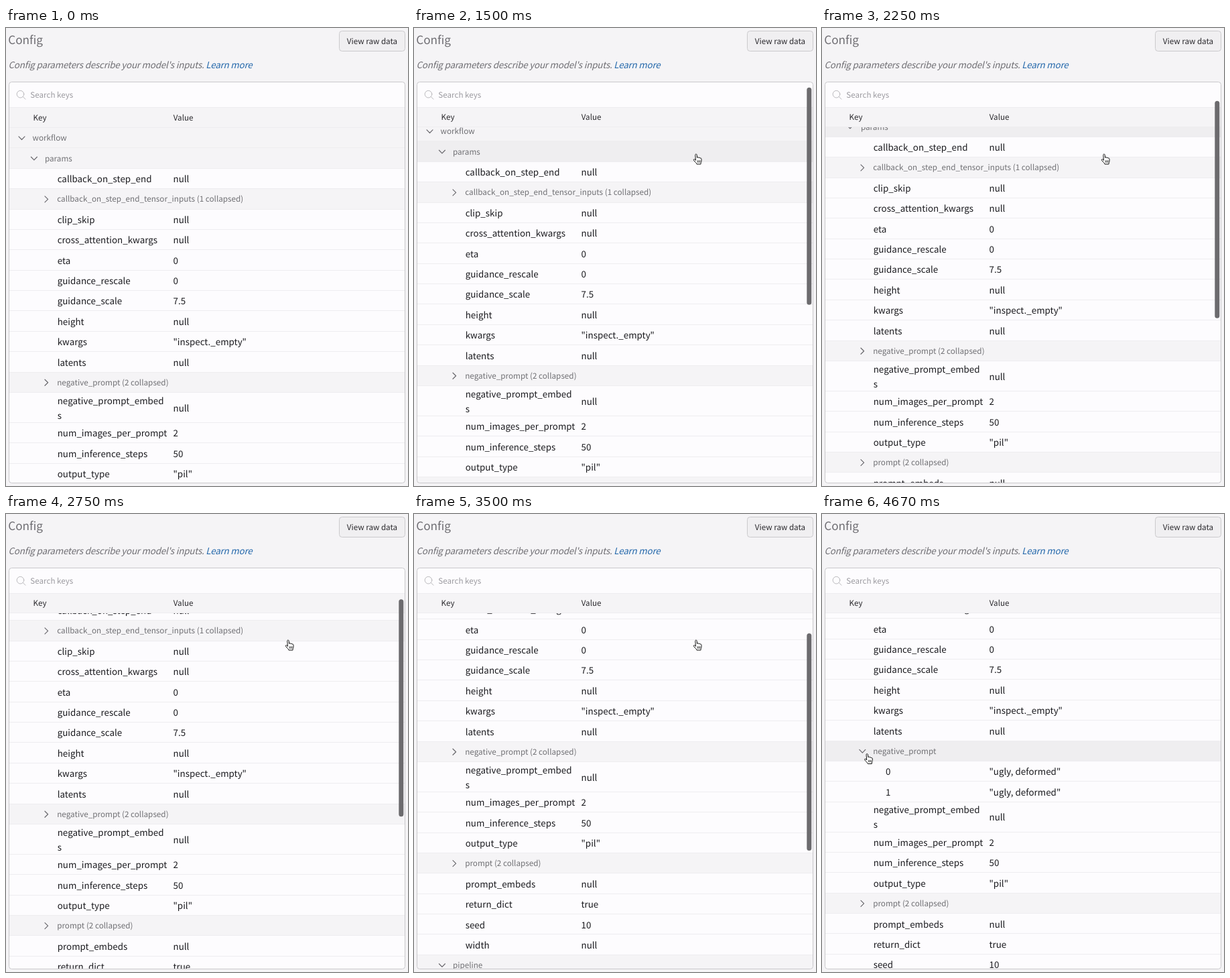
Animation of 600 by 683 pixels, one loop 5.01 s. Source, as an HTML page:

```html
<!DOCTYPE html>
<html lang="en">
<head>
<meta charset="utf-8">
<title>Config</title>
<style>
  html, body { margin: 0; width: 100%; height: 100%; overflow: hidden; background: #f5f4f6; }
  svg { display: block; width: 600px; height: 683px; }
  text {
    font: 11.65px "Noto Sans CJK JP", "Noto Sans CJK SC", "Noto Sans", sans-serif;
    text-rendering: geometricPrecision;
    fill: #2b2a2e;
  }
  .title { font-size: 17.2px; fill: #6f6e73; }
  .intro { font-size: 13.4px; font-style: italic; letter-spacing: -.2px; fill: #6f6e73; }
  .link { fill: #2468ab; }
  .hint { fill: #9c9ba0; }
  .cell { font-size: 13.4px; fill: #1b1b1f; }
  .group { font-size: 11.72px; fill: #707074; }
  .icon { fill: none; stroke: #6a696e; stroke-width: 1.2; stroke-linecap: round; stroke-linejoin: round; }
</style>
</head>
<body>
<svg viewBox="0 0 600 683">
  <clipPath id="inside"><rect x="5" y="81" width="590" height="597" rx="3"/></clipPath>
  <rect width="600" height="683" fill="#f5f4f6"/>
  <text class="title" x="3.2" y="24">Config</text>
  <rect x="497.5" y="4.5" width="98" height="30" rx="4" fill="#f0eff1" stroke="#cbcacd"/>
  <text x="546.5" y="24" text-anchor="middle">View raw data</text>
  <text class="intro" x="3.5" y="60">Config parameters describe your model's inputs. <tspan class="link">Learn more</tspan></text>

  <g clip-path="url(#inside)">
    <rect x="5" y="81" width="590" height="597" fill="#fdfcfe"/>
    <g id="rows"></g>
    <g id="header">
      <rect x="5" y="118" width="590" height="31" fill="#f5f4f6"/>
      <rect x="5" y="148" width="590" height="1" fill="#eeedf0"/>
      <text x="40.5" y="138">Key</text>
      <text x="249.7" y="138">Value</text>
    </g>
    <rect x="5" y="81" width="590" height="37" fill="#fdfcfe"/>
    <rect x="5" y="118" width="590" height="1" fill="#eeedf0"/>
    <g fill="none" stroke="#b9b8bc" stroke-linecap="round">
      <circle cx="21.5" cy="98.7" r="5.3"/>
      <path d="M25.4 102.6L29 106.2"/>
    </g>
    <text class="hint" x="36.3" y="104">Search keys</text>
    <rect id="thumb" x="586.3" width="7" height="324" rx="3.5" fill="#6c6b6e"/>
  </g>
  <rect x="4.5" y="80.5" width="591" height="598" rx="4" fill="none" stroke="#c9c8cb"/>

  <g id="cursor">
    <path id="arrow" d="M0 0V13.6L3.2 10.7L5.3 15.8L7.9 14.7L5.8 9.8H10Z" fill="#000" stroke="#fff"/>
    <g id="hand" transform="translate(-3.6 -1.6)" stroke="#111" stroke-linecap="round" stroke-linejoin="round">
      <path fill="#fff" d="M4 9.6L3.4 2C3.3 .3 5.6 .2 5.8 1.9L6.3 6C6.3 5 8.4 5 8.5 6.3C8.8 5.5 10.5 5.6 10.6 6.9C11 6.3 12.6 6.5 12.6 8V10.5C12.6 12.5 11.6 13 11.6 15.6H5.6C5.2 13.6 3 12.6 1.2 9.9C.2 8.3 2.2 7.4 4 9.6Z"/>
      <path fill="none" stroke-width=".8" d="M6.9 10.3V13M8.7 10.3V13M10.5 10.3V13"/>
    </g>
  </g>
</svg>

<script>
const LOOP = 5010, STEP = 250 / 3, EXPAND_AT = 4580;
const ROW = 30.38, WRAPPED_ROW = 44.9, TOP = 149;
const $ = id => document.getElementById(id);

// [depth, key, value]; a row without a value is a group, "+" marks it as collapsed
const before = [
  [0, 'workflow'],
  [1, 'params'],
  [2, 'callback_on_step_end', 'null'],
  [2, '+callback_on_step_end_tensor_inputs (1 collapsed)'],
  [2, 'clip_skip', 'null'],
  [2, 'cross_attention_kwargs', 'null'],
  [2, 'eta', '0'],
  [2, 'guidance_rescale', '0'],
  [2, 'guidance_scale', '7.5'],
  [2, 'height', 'null'],
  [2, 'kwargs', '"inspect._empty"'],
  [2, 'latents', 'null'],
];
const collapsed = [[2, '+negative_prompt (2 collapsed)']];
const expanded = [
  [2, 'negative_prompt'],
  [3, '0', '"ugly, deformed"'],
  [3, '1', '"ugly, deformed"'],
];
const after = [
  [2, 'negative_prompt_embed|s', 'null'],
  [2, 'num_images_per_prompt', '2'],
  [2, 'num_inference_steps', '50'],
  [2, 'output_type', '"pil"'],
  [2, '+prompt (2 collapsed)'],
  [2, 'prompt_embeds', 'null'],
  [2, 'return_dict', 'true'],
  [2, 'seed', '10'],
  [2, 'width', 'null'],
  [1, 'pipeline'],
];

const scrollKeys = [
  [1250, 0], [1830, 24], [2250, 47], [2750, 81], [3170, 154],
  [3330, 168], [3420, 172], [3500, 174], [3580, 175],
];
const thumbKeys = [[1250, 0], [1330, 1], [4000, 1], [4170, 0]];
const cursorKeys = [
  [500, 551, 246], [580, 512, 236], [670, 478, 227], [920, 478, 227],
  [1000, 471, 224.5], [1080, 450, 212], [1170, 428, 196], [1250, 420, 189],
  [3670, 420, 189], [3750, 405, 198], [3830, 350, 228], [3920, 255, 275],
  [4000, 165, 318], [4080, 110, 341], [4170, 82, 351], [4250, 74, 355],
  [4330, 69, 357.5], [4420, 66.3, 358.5],
];

function sample(keys, t) {
  if (t <= keys[0][0]) return keys[0].slice(1);
  const i = keys.findIndex(k => k[0] > t);
  if (i < 0) return keys[keys.length - 1].slice(1);
  const a = keys[i - 1], b = keys[i];
  const p = (t - a[0]) / (b[0] - a[0]);
  return a.slice(1).map((v, n) => v + (b[n + 1] - v) * p);
}

function layout(list) {
  let y = TOP;
  return list.map(([depth, key, value]) => {
    const height = key.includes('|') ? WRAPPED_ROW : ROW;
    const row = { depth, key, value, y, height, isGroup: value === undefined };
    y += height;
    return row;
  });
}

const label = (kind, x, y, str) => `<text class="${kind}" x="${x}" y="${Math.round(y)}">${str}</text>`;

function chevron(x, y, closed) {
  const d = closed ? 'M-2.3 -4.5L2.3 0L-2.3 4.5' : 'M-4.5 -2.3L0 2.3L4.5 -2.3';
  return `<path class="icon" transform="translate(${x} ${y})" d="${d}"/>`;
}

function drawRow({ depth, key, value, y, height, isGroup }) {
  const top = Math.round(y), bottom = Math.round(y + height), mid = y + height / 2;
  const back = `<rect class="back" x="5" y="${top}" width="590" height="${bottom - top}"/>
    <rect x="5" y="${bottom - 1}" width="590" height="1" fill="#eeedf0"/>`;
  if (isGroup) {
    const closed = key[0] === '+';
    return back + chevron(23.5 + 18.4 * depth, mid, closed)
      + label('group', 39.6 + 18.3 * depth, mid + 4.1, key.replace('+', ''));
  }
  const lines = key.split('|');
  const baseline = mid + 5.2;
  const first = baseline - 11 * (lines.length - 1);
  return back + lines.map((s, i) => label('cell', 40.1 + 18.3 * depth, first + 22 * i, s)).join('')
    + label('cell', 249.5, baseline, value);
}

const closedRows = layout([...before, ...collapsed, ...after]);
const openRows = layout([...before, ...expanded, ...after]);
let shown, backs;

function showRows(rows) {
  if (rows === shown) return;
  shown = rows;
  $('rows').innerHTML = rows.map(drawRow).join('');
  backs = [...$('rows').querySelectorAll('.back')];
}

function render(t) {
  const [scrolled] = sample(scrollKeys, t);
  const scroll = Math.round(scrolled);
  const [x, y] = sample(cursorKeys, t);
  const present = t >= 500;

  showRows(t >= EXPAND_AT ? openRows : closedRows);
  $('rows').setAttribute('transform', `translate(0 ${-scroll})`);
  $('header').setAttribute('transform', `translate(0 ${-Math.min(1, scroll)})`);
  $('thumb').setAttribute('y', 83 + scrolled * .546);
  $('thumb').setAttribute('opacity', sample(thumbKeys, t)[0]);

  // Hover is refreshed only when the pointer moves, not while scrolling
  const hoverY = y + (t < 3750 ? 0 : scroll);
  const hovered = present && shown.find(r => hoverY >= r.y && hoverY < r.y + r.height);
  shown.forEach((r, i) => backs[i].setAttribute('fill',
    r === hovered ? '#efeef0' : r.isGroup ? '#f5f4f6' : '#fdfcfe'));

  const pointing = hovered && hovered.isGroup;
  $('cursor').setAttribute('visibility', present ? 'visible' : 'hidden');
  $('cursor').setAttribute('transform', `translate(${x} ${y})`);
  $('hand').setAttribute('display', pointing ? 'inline' : 'none');
  $('arrow').setAttribute('display', pointing ? 'none' : 'inline');
}

const start = performance.now();
function tick() {
  const t = (performance.now() - start) % LOOP;
  const step = Math.floor((t + 4) / STEP);
  render(Math.round(step * STEP / 10) * 10);
  requestAnimationFrame(tick);
}
tick();
</script>
</body>
</html>
```
